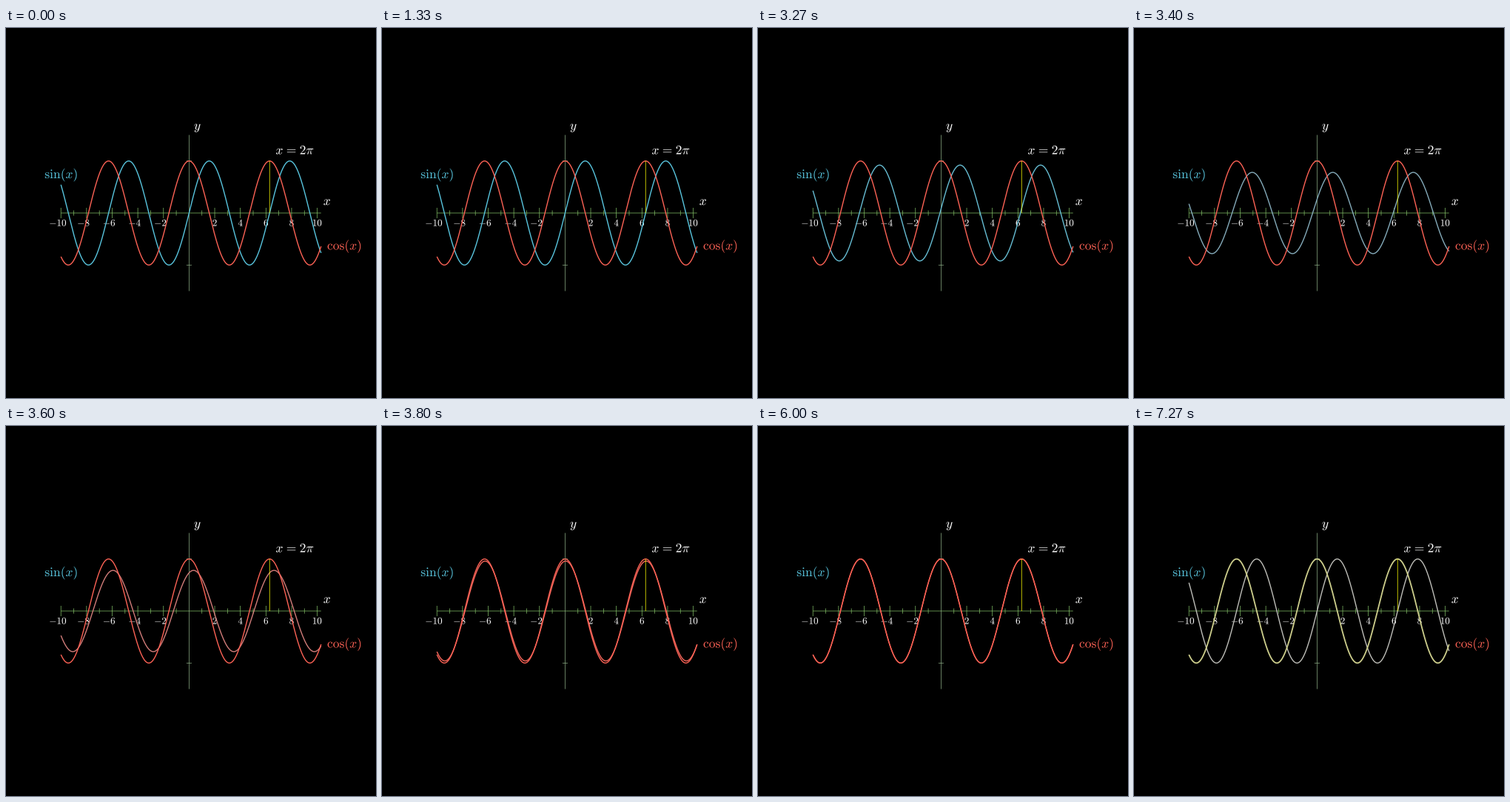
Animation of 500 by 500 pixels, one loop 8000 ms. Source, as a matplotlib script:

```python
import numpy as np
import matplotlib as mpl
import matplotlib.pyplot as plt
from matplotlib.animation import FuncAnimation
from matplotlib.colors import to_rgb
from matplotlib.patches import PathPatch
from matplotlib.textpath import TextPath
from matplotlib.transforms import Affine2D

mpl.rcParams["mathtext.fontset"] = "cm"

SIZE, DPI = 500, 100
FPS, FRAMES = 15, 120
UNIT = SIZE / (128 / 9)          # pixels per scene unit
XS, YS = 10 * UNIT / 20.3, 2 * UNIT
LEFT, MID = SIZE / 2 - 5 * UNIT, SIZE / 2
X0 = LEFT + 10 * XS
EM = 0.498 * UNIT

BLUE, RED, GREEN, YELLOW = "#58C4DD", "#FC6255", "#83C167", "#FFFF00"
SOFT_GREEN, GREY, STRAW = "#8FB088", "#BDBDB8", "#CDCE8C"
MORPH_START, MORPH_TIME, RECOLOR = 3.0, 1.0, 7.0

fig = plt.figure(figsize=(SIZE / DPI, SIZE / DPI), dpi=DPI, facecolor="black")
ax = fig.add_axes([0, 0, 1, 1])
ax.set_xlim(0, SIZE)
ax.set_ylim(SIZE, 0)
ax.axis("off")


def px(x):
    return X0 + XS * x


def py(y):
    return MID - YS * y


def stroke(xs, ys, color, width, z):
    line, = ax.plot(xs, ys, color=color, lw=width * 72 / DPI, zorder=z,
                    solid_capstyle="butt", snap=False)
    return line


def label(tex, x, base, color="white", em=EM, align="left", z=1):
    """Place formula ink by its left edge or centre, on a baseline."""
    path = TextPath((0, 0), f"${tex}$", size=em)
    box = path.get_extents()
    anchor = box.x0 if align == "left" else (box.x0 + box.x1) / 2
    path = path.transformed(Affine2D().translate(-anchor, 0).scale(1, -1).translate(x, base))
    ax.add_patch(PathPatch(path, fc=color, lw=0, zorder=z))


def draw_axes():
    thin, tick = 0.72, 0.1 * UNIT
    stroke([LEFT, px(10.3)], [MID, MID], GREEN, thin, 1)
    stroke([X0, X0], [py(1.5), py(-1.5)], SOFT_GREEN, thin, 1)
    for n in range(-10, 11):
        if n == 0:
            continue
        half = tick * (2 if n % 2 == 0 else 1)
        stroke([px(n)] * 2, [MID - half, MID + half], GREEN, thin, 1)
        if n % 2 == 0:
            em = 0.75 * EM
            shift = 0.305 * em if n < 0 else 0
            label(str(n), px(n) - shift, MID + 0.25 * UNIT + 0.666 * em,
                  em=em, align="center")
    for n in (-1, 1):
        stroke([X0 - tick, X0 + tick], [py(n)] * 2, SOFT_GREEN, thin, 1)
    label("x", px(10.3) + tick, MID - 3 * tick - 0.01 * EM)
    label("y", X0 + 2 * tick, py(1.5) - tick - 0.205 * EM)


def smooth(t):
    t = np.clip(t, 0, 1)
    low = 1 / (1 + np.exp(5))
    return np.clip((1 / (1 + np.exp(-10 * (t - 0.5))) - low) / (1 - 2 * low), 0, 1)


def mix(a, b, k):
    return tuple((1 - k) * np.array(to_rgb(a)) + k * np.array(to_rgb(b)))


draw_axes()
xs = np.linspace(-10, 10.3, 600)
sine = stroke(px(xs), py(np.sin(xs)), BLUE, 1.4, 2)
cosine = stroke(px(xs), py(np.cos(xs)), RED, 1.4, 3)
stroke([px(2 * np.pi)] * 2, [py(0), py(1)], YELLOW, 0.75, 4)

label(r"\mathrm{sin}(x)", LEFT, py(np.sin(-10)) - 0.125 * UNIT - 0.25 * EM,
      BLUE, align="center", z=5)
label(r"\mathrm{cos}(x)", px(10.3) + 0.25 * UNIT, py(np.cos(10.3)) + 0.25 * EM,
      RED, z=5)
label(r"x\hspace{0.08}=\hspace{0.08}2\pi", px(2 * np.pi) + 0.25 * UNIT,
      py(1) - 0.25 * UNIT - 0.02 * EM, z=5)


def update(i):
    t = i / FPS
    recolored = t >= RECOLOR
    k = 0 if recolored else smooth((t - MORPH_START) / MORPH_TIME)
    sine.set_ydata(py((1 - k) * np.sin(xs) + k * np.cos(xs)))
    sine.set_color(GREY if recolored else mix(BLUE, RED, k))
    cosine.set_color(STRAW if recolored else RED)
    cosine.set_linewidth((1.8 if recolored else 1.4) * 72 / DPI)
    return sine, cosine


anim = FuncAnimation(fig, update, frames=FRAMES, interval=1000 / FPS,
                     repeat=True, repeat_delay=0)
plt.show()
```
